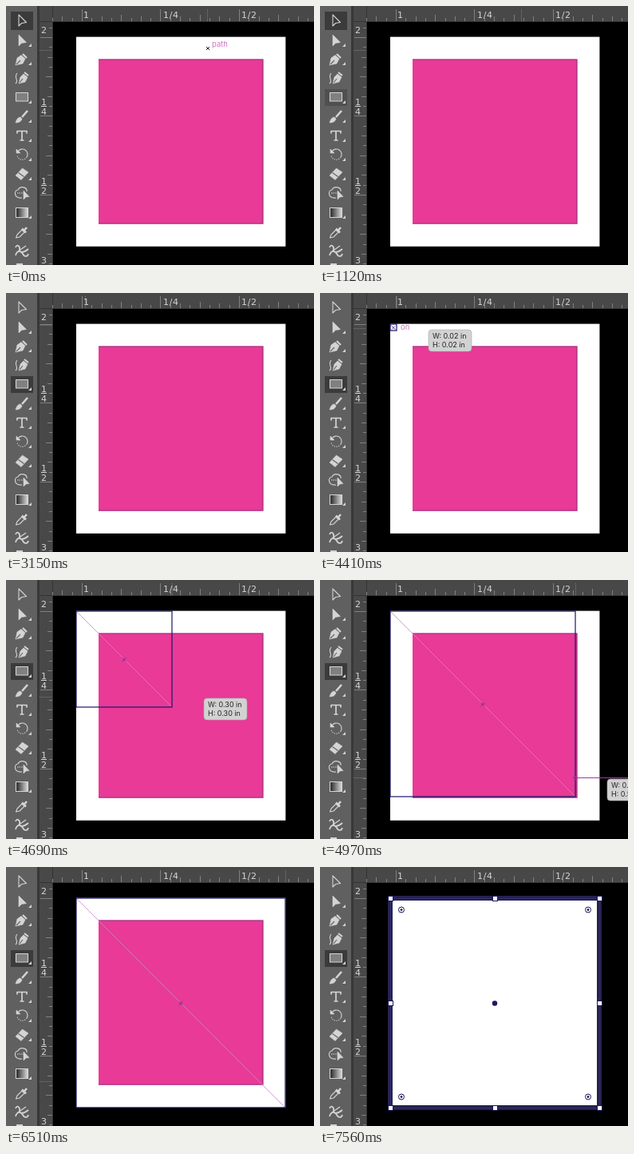
Recreate the animation shown at these times as an HTML page. Size 386 by 324 pixels, loop 7.84 s.

```html
<!DOCTYPE html>
<html>
<head>
<meta charset="utf-8">
<style>
  html, body { margin: 0; width: 100%; height: 100%; overflow: hidden; background: #000; }
  svg { display: block; }
  .ruler { font: 11px "DejaVu Sans", sans-serif; letter-spacing: .7px; fill: #d4d4d4; }
  .hint { font: 9.5px Inter, sans-serif; fill: #c778bd; }
  .tip { font: 9px Inter, sans-serif; fill: #222; }
  .crisp { shape-rendering: crispEdges; }
  #icons { fill: none; stroke: #d4d4d4; stroke-width: 1.1; stroke-linejoin: round; }
  #icons .solid { fill: #d4d4d4; stroke-width: .6; }
</style>
</head>
<body>
<svg width="386" height="324" viewBox="0 0 386 324">
  <defs>
    <linearGradient id="fade"><stop stop-color="#222"/><stop offset="1" stop-color="#ddd"/></linearGradient>
  </defs>

  <rect x="88" y="38.6" width="262.4" height="262.2" fill="#fff"/>
  <g id="pink">
    <rect x="116" y="66.5" width="206.6" height="206.2" fill="#e83a96"/>
    <path d="M116 67H321.700V272H116" fill="none" stroke="#8a3080" stroke-opacity=".55" stroke-width="1.500"/>
  </g>

  <g id="pathHint">
    <path d="M251 51l4 4m0-4l-4 4" stroke="#222"/>
    <text class="hint" x="258" y="51">path</text>
  </g>

  <g id="drag" fill="none">
    <path id="diagonal" stroke="#c987c6" stroke-width=".8"/>
    <rect id="outline" x="88" y="39" stroke="#1a1766" stroke-width="1.2"/>
    <path id="center" stroke="#4a2c92" stroke-width=".9"/>
    <path id="guide" d="M320 247.5H386M318 245.5h4v4h-4z" stroke="#a33a9c"/>
    <text id="onHint" class="hint" x="101" y="45.5">on</text>
    <g id="tip">
      <rect width="54" height="27" rx="4" fill="#d2d2d2" stroke="#aaa" stroke-width=".6"/>
      <text id="tipW" class="tip" x="5" y="10.5"/>
      <text id="tipH" class="tip" x="5" y="21.5"/>
    </g>
  </g>

  <g id="selected">
    <rect x="88" y="39" width="262" height="262" fill="#fff" stroke="#25214d" stroke-width="6"/>
    <rect x="88.5" y="39.5" width="262" height="262" fill="none" stroke="#39368c" stroke-opacity=".6"/>
    <g id="handles" fill="#fff" stroke="#17145c"></g>
    <circle cx="219" cy="170.5" r="3.2" fill="#1b1868"/>
  </g>

  <g class="crisp">
    <path d="M42 0H386V20H58V324H42z" fill="#484848"/>
    <path d="M58.5 324V19.5H386M42 19.5H58.5V0" stroke="#343434" fill="none"/>
    <path id="ticks" stroke="#808080"/>
    <path id="marks" stroke="#7c7c7c" stroke-dasharray="1 1"/>
  </g>
  <g id="labels" class="ruler"></g>

  <g class="crisp">
    <rect width="40" height="324" fill="#606060"/>
    <rect x="39" width="3" height="324" fill="#383838"/>
    <rect id="active" x="6" width="28" fill="#3b3b3b"/>
    <rect id="hover" x="6" y="104" width="28" height="21" fill="#505050"/>
  </g>
  <g id="icons">
    <path d="M16 11V25L19.5 21.5 25.5 20.5z"/>
    <path class="solid" d="M16 36V50L19.5 46.5 25.5 45.5z"/>
    <path class="solid" d="M12 74L14 65 19 61.5 24 66 21 72z"/>
    <path d="M13 73L18 68" stroke="#606060"/>
    <path d="M21 60L26 65" stroke-width="2.2"/>
    <path class="solid" d="M16 97L18 89 22 85 27 89 24 95z"/>
    <path d="M17 96L21 91" stroke="#606060"/>
    <path d="M23 83L28 87" stroke-width="2"/>
    <path d="M12 97C17 93 9 90 14 84"/>
    <rect x="12.5" y="108.5" width="15" height="10.500" fill="#808080"/>
    <path d="M27 131L20 139" stroke-width="2.6"/>
    <path class="solid" d="M18 139Q14 139 12 146Q19 146 20 141z"/>
    <path d="M14 159.500V156.500H26V159.500M20 156.500V168M17.500 168H22.500" stroke-width="1.7"/>
    <path d="M15 182A6.500 6.500 0 1 1 26 189"/>
    <path d="M26 189A6.500 6.500 0 0 1 14 187" stroke-dasharray="1.2 1.5"/>
    <path class="solid" d="M13 179V184H18z"/>
    <path class="solid" d="M12 212L20.500 203 28 208 19 217.500z"/>
    <path d="M15.500 208.500L22.500 213.500" stroke="#606060"/>
    <path d="M20 240C9 241 10 230 15 230C18 224 27 227 26 232"/>
    <path d="M14 234H22" stroke-dasharray="1.500 1"/>
    <path class="solid" d="M22 231V242L25 239 29 238.500z"/>
    <rect x="12.500" y="252.500" width="15" height="12" fill="url(#fade)"/>
    <path d="M12.500 290L14 286 20 280 23 283 17 289z"/>
    <path d="M20 278.500L25 283.500M22 281.500L26 277" stroke-width="2.600"/>
    <path d="M12 302C14 297 18 301 17 305S22 309 28 304M12 312C14 305 19 306 21 310S27 314 28 310" stroke-width="1.700"/>
    <path d="M15 307L25 300" stroke-width="1.300"/>
    <path d="M13 323H21" stroke-width="2"/>
    <path id="corners" class="solid" stroke="none"/>
  </g>
</svg>
<script>
const $ = id => document.getElementById(id);
const set = (id, attrs) => { for (const k in attrs) $(id).setAttribute(k, attrs[k]); };
const show = (id, on) => { $(id).style.display = on ? '' : 'none'; };

const LOOP = 7840, STEP = 70, PER_INCH = 394;
const LEFT = 88, TOP = 39;
// Drag side length and pointer position as [time, value] keys
const SIZE = [[4340, 0], [4410, 8], [4970, 232], [5180, 268], [5390, 278], [5600, 267],
  [5810, 268], [5880, 267], [6370, 267], [6510, 262]];
const POINTER_X = [[2100, 252], [2170, 62], [2870, 118], [3290, 89]];
const POINTER_Y = [[2100, 55], [2170, 114], [2870, 41], [3290, 40], [4340, 40], [4410, 44],
  [4970, 247], [5390, 285], [5600, 274], [6370, 274], [6510, 268]];

function at(keys, t) {
  const i = keys.findIndex(k => k[0] > t);
  if (i < 0) return keys[keys.length - 1][1];
  if (i === 0) return keys[0][1];
  const [t0, a] = keys[i - 1], [t1, b] = keys[i];
  return a + (b - a) * (t - t0) / (t1 - t0);
}

function buildRulers() {
  let d = '';
  for (let i = -4; i < 28; i++) {
    const x = Math.round(95 + i * 12.31) + .5, y = Math.round(39 + i * 12.31) + .5;
    const len = i % 8 === 0 ? 15 : i % 4 === 0 ? 8 : i % 2 === 0 ? 6 : 4;
    if (x > 58) d += `M${x} 19v${-len}`;
    if (y > 20) d += `M58 ${y}h${-len}`;
  }
  set('ticks', { d });
  const text = (x, y, s) => `<text x="${x}" y="${y}">${s}</text>`;
  const fraction = (y, n) => text(44, y, 1) + text(44, y + 12, n) +
    `<path d="M44 ${y + 1.5}h7" stroke="#d4d4d4"/>`;
  $('labels').innerHTML = text(97, 15, 1) + text(197, 15, '1/4') + text(295, 15, '1/2') +
    text(44, 34, 2) + fraction(124, 4) + fraction(223, 2) + text(44, 322, 3);
}

function buildHandles() {
  let s = '';
  for (const x of [88, 219, 350]) for (const y of [39, 170, 301])
    if (x !== 219 || y !== 170)
      s += `<rect x="${x - 2.5}" y="${y - 2.5}" width="6" height="6"/>`;
  for (const x of [102, 336]) for (const y of [53.5, 287.5])
    s += `<circle cx="${x}" cy="${y}" r="3.5"/><circle cx="${x}" cy="${y}" r="1" fill="#17145c"/>`;
  $('handles').innerHTML = s;
}

function draw(time) {
  const t = Math.floor(time % LOOP / STEP) * STEP;
  const rectTool = t >= 1680, dragging = t >= 4410 && t < 7280, done = t >= 7280;

  set('active', rectTool ? { y: 104, height: 21 } : { y: 7, height: 23 });
  show('hover', t >= 1050 && !rectTool);
  show('pathHint', t < 1050);
  show('pink', !done);
  show('selected', done);
  show('drag', dragging);
  show('marks', !done);

  const size = at(SIZE, t);
  const px = Math.round(dragging ? LEFT + size : at(POINTER_X, t));
  const py = Math.round(at(POINTER_Y, t));
  set('marks', { d: `M${px + .5} 4V19M42 ${py + .5}H58` });
  if (!dragging) return;

  const side = Math.round(size), mx = LEFT + side / 2, my = TOP + side / 2 + .5;
  set('outline', { width: side, height: side });
  set('diagonal', { d: `M${LEFT} ${TOP}l${side} ${side}` });
  set('center', { d: `M${mx - 2} ${my - 2}l4 4m0-4l-4 4` });
  show('guide', t === 4970);
  show('onHint', t === 4410);
  set('tip', { transform: `translate(${px + 40} ${py + 2})` });
  const inches = (size / PER_INCH).toFixed(2);
  $('tipW').textContent = `W: ${inches} in`;
  $('tipH').textContent = `H: ${inches} in`;
}

buildRulers();
buildHandles();
set('corners', { d: [43, 66, 114, 138, 162, 186, 210, 258].map(y => `M32 ${y + 4}v4h-4z`).join('') });

const start = performance.now();
(function tick() {
  draw(performance.now() - start);
  requestAnimationFrame(tick);
})();
</script>
</body>
</html>
```
